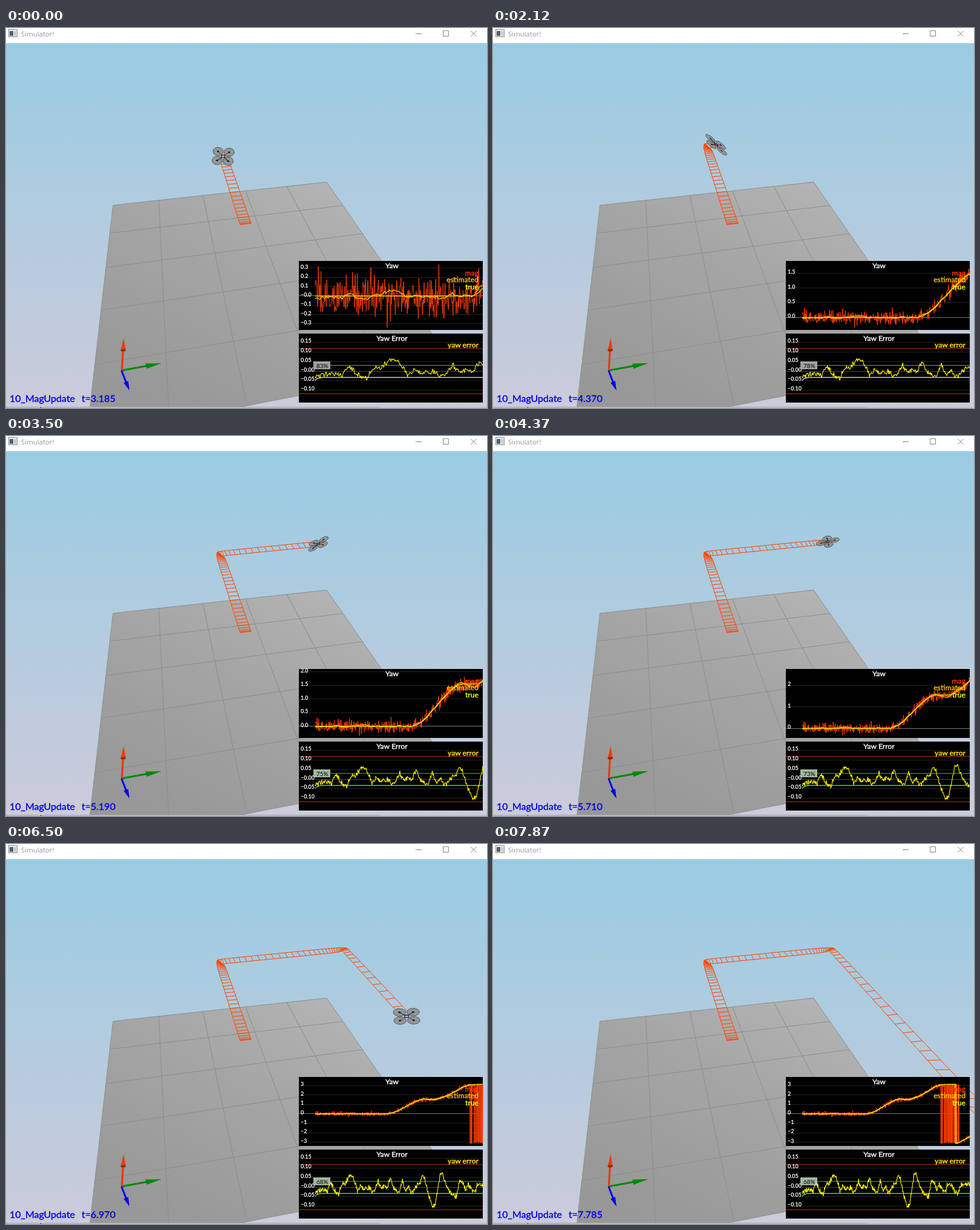
These frames come from a looping animation (795x628 px, 8000 ms). An HTML page:

```html
<!DOCTYPE html>
<html lang="en">
<head>
<meta charset="utf-8">
<title>Simulator!</title>
<style>
  html, body { margin: 0; width: 100%; height: 100%; overflow: hidden; background: #fff; }
  svg { display: block; width: 100vw; height: 100vh; }
  path { fill: none; }
  text { font-family: Lato, "Open Sans", sans-serif; white-space: pre; }
  .crisp { shape-rendering: crispEdges; }
  .head, .key { font-size: 12.2px; stroke-width: .4; }
  .head { fill: #fff; stroke: #fff; text-anchor: middle; }
  .key { text-anchor: end; }
  .tick { font-size: 9px; font-weight: 700; fill: #fff; }
  .status { font-size: 16px; fill: #0000e6; stroke: #0000e6; stroke-width: .35; }
  .trace { stroke-linejoin: bevel; }
  #drone * { vector-effect: non-scaling-stroke; }
</style>
</head>
<body>
<svg viewBox="0 0 795 628" preserveAspectRatio="none">
  <defs>
    <linearGradient id="sky" x2="0" y2="1">
      <stop offset="0" stop-color="#99cce3"/><stop offset="1" stop-color="#cccbdb"/>
    </linearGradient>
    <linearGradient id="slab" gradientUnits="userSpaceOnUse" x1="500" y1="250" x2="300" y2="640">
      <stop offset="0" stop-color="#b3b3b3"/><stop offset=".4" stop-color="#a5a5a5"/><stop offset="1" stop-color="#989898"/>
    </linearGradient>
  </defs>

  <rect y="25" width="795" height="603" fill="url(#sky)"/>
  <path id="floor" style="fill:url(#slab)"/>
  <path id="tiles" stroke="#8b8f8f"/>

  <g stroke-linecap="round">
    <path id="ghostA" stroke="#c3c8b4" d="M337 181L347 190M335 197L344 199M341 201L346 205"/>
    <path id="ghostB" stroke="#b9ccd6" d="M534 168Q537 161 545 161M523 183L530 188M548 162L551 166"/>
  </g>
  <path id="trail" stroke="#ff4500"/>
  <g id="drone"></g>

  <g id="axes" stroke-width="3">
    <path stroke="#008a00" d="M191 566L232 558.5"/>
    <path style="fill:#008a00" stroke="none" d="M257 554L230.5 554.5L232.5 563Z"/>
    <path stroke="#f03400" d="M191.5 566L193.5 530"/>
    <path style="fill:#f03c08" stroke="none" d="M194.5 512L189.5 533H198Z"/>
    <ellipse cx="193.7" cy="532.5" rx="4.2" ry="2" fill="#9c2400"/>
    <path stroke="#0000ee" d="M191 566L199 587"/>
    <path style="fill:#0000ee" stroke="none" d="M204 599L194.5 586.5L202 583Z"/>
  </g>
  <text class="status" x="6" y="618">10_MagUpdate</text>
  <text class="status" x="125" y="618" id="clock"></text>

  <g class="crisp">
    <rect x="484" y="385" width="304" height="114"/>
    <rect x="484" y="505" width="304" height="114"/>
    <path id="grid" stroke="#222"/>
    <path id="zero" stroke="#777"/>
    <path id="errGrid" stroke="#222"/>
    <path stroke="#484848" d="M484 567.5H788"/>
    <path stroke="#a03410" d="M484 529.5H788M484 604.5H788"/>
    <path id="upper" d="M536 557.5H788"/>
  </g>
  <path id="lower" d="M511 583Q513 577.5 525 577.5H788" stroke-width="1.3"/>
  <g class="trace">
    <path id="mag" stroke="#ff3c00"/>
    <path id="est" stroke="#ffc400" stroke-width="1.3"/>
    <path id="true" stroke="#e4f000" stroke-width="1.2"/>
    <path id="err" stroke="#fff000" stroke-width="1.1"/>
  </g>
  <g id="ticks"></g>
  <g id="errTicks"></g>
  <rect id="pctBox" x="508" y="551" width="28" height="13" fill-opacity=".85"/>
  <text id="pct" x="513" y="562" font-size="10"></text>
  <text class="head" x="638" y="397">Yaw</text>
  <text class="head" x="638" y="517">Yaw Error</text>
  <text class="key" x="781" y="409" fill="#ff3c00" stroke="#ff3c00">mag</text>
  <text class="key" x="781" y="420" fill="#ffc000" stroke="#ffc000">estimated</text>
  <text class="key" x="781" y="432" fill="#e8ff00" stroke="#e8ff00">true</text>
  <text class="key" x="781" y="528" fill="#fff000" stroke="#fff000">yaw error</text>

  <g id="window">
    <rect width="795" height="25" fill="#fff"/>
    <rect x="4.5" y="2.5" width="14" height="12" fill="#f4f4f4" stroke="#808890"/>
    <rect x="6" y="5" width="6" height="8" fill="#52606a"/>
    <rect x="13" y="5" width="4" height="8" fill="#c4ccd2"/>
    <text x="25" y="14" fill="#969696" style="font:11.4px 'Open Sans',sans-serif">Simulator!</text>
    <path stroke="#888" d="M677 9.5H687M722.5 4.5H731.5V13.5H722.5ZM768 4.5L777.5 14M777.5 4.5L768 14"/>
    <rect y="626" width="795" height="2" fill="#c2c2c8"/>
    <rect y="626" width="618" height="1" fill="#a9a9ae"/>
    <rect x="57" y="626" width="1" height="2" fill="#444"/>
  </g>
</svg>
<script>
const LOOP = 8000, STEP = 125;
const WRAP = 6.28;   // simulated time when the magnetometer first passes pi
const SPREAD = .34;  // largest magnetometer noise
const $ = id => document.getElementById(id);
const draw = (id, d) => $(id).setAttribute("d", d);
const n1 = v => v.toFixed(1);

function random(seed) {
  return () => (seed = (seed * 16807) % 2147483647) / 2147483647;
}
const list = (n, f) => Array.from({ length: n }, f);

// Floor corner at column c, row r, seen in perspective
function corner(c, r) {
  const depth = 1 / (.002134 + .000038 * c - .000192 * r);
  return n1(230.6 + (.162 * c - .1145) * depth) + " " + n1(depth - 175.7);
}

function drawFloor() {
  let lines = "";
  for (let i = 0; i <= 5; i++)
    lines += `M${corner(i, 0)}L${corner(i, 5)}M${corner(0, i)}L${corner(5, i)}`;
  draw("tiles", lines);
  draw("floor", `M${corner(0, 0)}L${corner(5, 0)}L${corner(5, 5)}L${corner(0, 5)}Z`);
}

// Each leg: fast start, soft stop
const legs = [
  { start: 1.9, tau: .91, dx: -43, dy: -129.5 },
  { start: 4.13, tau: .85, dx: 207, dy: -20.5 },
  { start: 6.2, tau: 1.6, dx: 494, dy: 536 }];
const phase = (leg, t) => Math.max(0, t - leg.start) / leg.tau;

function place(t) {
  let x = 396, y = 324;
  for (const leg of legs) {
    const done = 1 - Math.exp(-(phase(leg, t) ** 2));
    x += leg.dx * done;
    y += leg.dy * done;
  }
  return { x, y, size: 1 + (y - 195) * .0033 };
}

function thrust(leg, t) {
  const u = phase(leg, t);
  return u && (2 - 4 * u * u) * Math.exp(-u * u) / leg.tau ** 2;
}

// A quarter turn begins every two seconds.
function yaw(t) {
  let a = 0;
  for (let i = 0; i < 3; i++) {
    const u = Math.min(1, Math.max(0, (t - 2.95 - 2 * i) / 1.65));
    a += 1.55 * u * u * (3 - 2 * u);
  }
  return a;
}
const wrap = a => a > Math.PI ? a - 2 * Math.PI : a;

const rndErr = random(77), rndMag = random(4242);
const sway = list(70, () => (rndErr() - .5) * 20);
const jitter = list(560, () => (rndErr() + rndErr() - 1) * 6);
const noise = list(800, () => {
  let s = -3;
  for (let i = 0; i < 6; i++) s += rndMag();
  return Math.max(-SPREAD, Math.min(SPREAD, s * .16));
});

const wave = (t, amp, peak, period, mid, width) =>
  amp * Math.cos(2 * Math.PI * (t - peak) / period) * Math.exp(-(((t - mid) / width) ** 2));

// Yaw error in pixels
function error(t) {
  const s = t / .125, i = Math.floor(s), u = s - i;
  return sway[i] * (1 - u) + sway[i + 1] * u + jitter[Math.round(t / .015)]
    + wave(t, -9, .9, 1.17, 1.5, .9) + wave(t, 14, 3.13, 1, 3.13, .2) + wave(t, 25, 4.45, .87, 5.1, .9);
}

function mag(t) {
  const v = yaw(t) + noise[Math.round(t / .01)];
  return t < WRAP ? Math.min(v, 3.12) : wrap(v);
}

function plot(f, T, dt, toY) {
  let d = "M";
  for (let i = 0; i * dt <= T; i++) {
    const t = i * dt;
    d += n1(511 + 277 * t / T) + " " + n1(toY(f(t))) + " ";
  }
  return d;
}

const rule = y => `M484 ${Math.floor(y) + .5}H788`;
const tick = (y, label) =>
  `<text class="tick" x="487" y="${n1(y)}">${label.replace("-", "−")}</text>`;

function drawYaw(T) {
  const low = T < WRAP ? -SPREAD : -Math.PI;
  const high = Math.min(Math.PI, Math.max(.3, yaw(T) + .2));
  const lo = low - .04 * (high - low), hi = high + .12 * (high - low), span = hi - lo;
  const toY = v => 385 + 114 * (hi - v) / span;
  const unit = span < .9 ? .1 : span < 3 ? .5 : 1;
  let grid = "", labels = "";
  for (let i = Math.ceil(lo / unit); i * unit < hi; i++) {
    const y = toY(i * unit);
    if (i) grid += rule(y);
    if (y < 389) continue;
    const text = (i * unit).toFixed(unit < 1 ? 1 : 0);
    labels += tick(y + 1, i === 0 && unit === .1 ? "-0.0" : text);
  }
  draw("grid", grid);
  draw("zero", rule(toY(0)));
  $("ticks").innerHTML = labels;
  draw("mag", plot(mag, T, .01, toY));
  draw("est", plot(t => wrap(yaw(t) + error(t) / 314), T, .03, toY));
  draw("true", plot(t => wrap(yaw(t)), T, .02, toY));
}

function drawError(T) {
  draw("err", plot(error, T, .015, v => 567 - v));
  const pct = Math.max(68, Math.round(94.8 - 3.8 * T)), ok = pct < 78;
  $("pct").textContent = pct + "%";
  $("pctBox").setAttribute("fill", ok ? "#bcd8bc" : "#bebebe");
  $("upper").setAttribute("stroke", ok ? "#48a048" : "#8c8c8c");
  $("lower").setAttribute("stroke", ok ? "#30e830" : "#cfcfcf");
}

function drawErrorGrid() {
  let lines = "", labels = "";
  for (let i = 3; i >= -2; i--) {
    const y = 567 - 15.7 * i;
    lines += rule(y);
    labels += tick(y + .5, i ? (i * .05).toFixed(2) : "-0.00");
  }
  draw("errGrid", lines);
  $("errTicks").innerHTML = labels;
}

// Ends of the ribbon rung at time t
function rung(t) {
  const { x, y, size } = place(t), a = yaw(t);
  const c = Math.cos(a) * size, k = Math.sin(a) * size;
  const vx = 6.5 * c + (.8 + (x - 354) * .014) * k, vy = -.6 * c + 4 * k;
  return [`${n1(x - vx)} ${n1(y - vy)}`, `${n1(x + vx)} ${n1(y + vy)}`];
}

function drawTrail(T) {
  const left = [], right = [];
  let d = "";
  for (let t = legs[0].start; t <= T; t += .055) {
    const [l, r] = rung(t);
    left.push(l);
    right.push(r);
    d += `M${l}L${r}`;
  }
  draw("trail", `${d}M${left.join("L")}M${right.join("L")}`);
  $("ghostA").style.opacity = T > 3.75 ? .9 : 0;
  $("ghostB").style.opacity = T > 5.9 ? .9 : 0;
}

function buildDrone() {
  const hubs = [[-8.7, -8.7], [8.7, -8.7], [8.7, 8.7], [-8.7, 8.7]];
  const discs = hubs.map(([x, y]) =>
    `<circle cx="${x}" cy="${y}" r="8" fill="#8b9296" fill-opacity=".9" stroke="#4c5052" stroke-width=".9"/>`);
  const arms = hubs.map(([x, y], i) =>
    `<path d="M0 0L${x} ${y}" stroke="${i < 2 ? "#c4401c" : "#3a3a3a"}" stroke-width="1.3"/>
     <circle cx="${x}" cy="${y}" r="1.6" fill="#111"/>`);
  $("drone").innerHTML = discs.join("") + arms.join("")
    + `<rect x="-2.5" y="-2.5" width="5" height="5" fill="#a9b2c4" stroke="#1c1c38" stroke-width="1.2"/>`;
}

// The body leans into its acceleration.
function drawDrone(T) {
  const { x, y, size } = place(T);
  const [ahead, right, back] = legs.map(leg => thrust(leg, T) * .32);
  const pitch = .5 - ahead + back;
  $("drone").setAttribute("transform", `translate(${n1(x)} ${n1(y)}) scale(${size.toFixed(3)})
    matrix(1 ${right.toFixed(3)} 0 ${pitch.toFixed(3)} 0 0) rotate(${n1(yaw(T) * 180 / Math.PI)})`);
}

drawFloor();
drawErrorGrid();
buildDrone();

let shown = -1;
function frame() {
  // Frame times are rounded to 10 ms, so a step may begin 5 ms early.
  const k = Math.floor((performance.now() + 5) % LOOP / STEP);
  if (k !== shown) {
    shown = k;
    // The simulation holds for one step at 1750 ms.
    const T = Math.round((3.185 + .0742 * (k < 14 ? k : k - 1)) * 200) / 200;
    $("clock").textContent = "t=" + T.toFixed(3);
    drawTrail(T);
    drawDrone(T);
    drawYaw(T);
    drawError(T);
  }
  requestAnimationFrame(frame);
}
frame();
</script>
</body>
</html>
```
